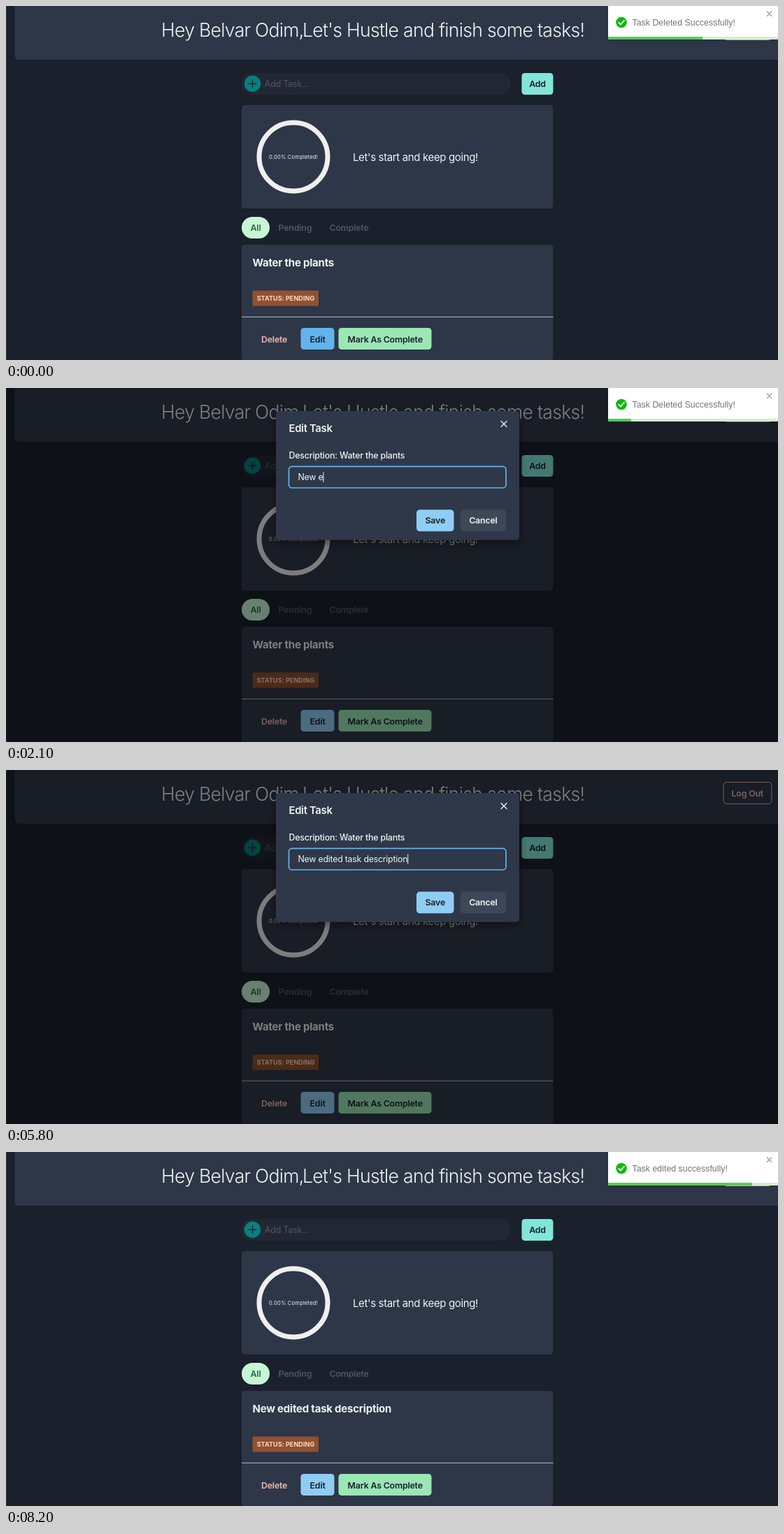
Write an HTML page that moves like this. It is 1104x507 px and loops after 8.3 s.

```html
<!DOCTYPE html>
<html lang="en">
<head>
<meta charset="utf-8">
<title>Task list</title>
<style>
  html, body { margin: 0; width: 100%; height: 100%; overflow: hidden; background: #1a202c; }
  svg { display: block; width: 100vw; height: 100vh; }
  text { font: 400 12.4px Inter, "Open Sans", sans-serif; letter-spacing: -.2px; font-optical-sizing: none; white-space: pre; fill: #f0f1f3; }
  .semi { font-weight: 600; }
  .medium { font-weight: 500; }
  .dark { fill: #1a202c; }
  .muted { fill: #4e5666; }
  .rose { fill: #f0b9ae; }
  .title { font-size: 26.6px; font-weight: 300; letter-spacing: -.72px; }
  .cheer { font-size: 15px; letter-spacing: -.36px; }
  .task { font-size: 15px; font-weight: 700; letter-spacing: -.22px; }
  .badge { font-size: 9px; font-weight: 700; letter-spacing: .08px; fill: #fbd9c6; }
  .percent { font-size: 7.6px; letter-spacing: .18px; }
  .heading { font-size: 14.9px; font-weight: 600; letter-spacing: -.35px; }
  .entry { letter-spacing: -.25px; }
  .notice { font: 400 12.4px "Liberation Sans", Arial, sans-serif; letter-spacing: 0; fill: #757575; }
  .mid { text-anchor: middle; }
  .line { fill: none; stroke-linecap: round; stroke-linejoin: round; }
</style>
</head>
<body>
<svg viewBox="0 0 1104 507">
  <defs>
    <filter id="dialogShadow" x="-10%" y="-15%" width="120%" height="140%">
      <feDropShadow dx="0" dy="5" stdDeviation="6" flood-color="#000" flood-opacity=".4"/>
    </filter>
    <filter id="toastShadow" x="-10%" y="-30%" width="120%" height="170%">
      <feDropShadow dx="0" dy="1" stdDeviation="3" flood-color="#000" flood-opacity=".15"/>
    </filter>
  </defs>

  <rect width="1104" height="507" fill="#1a202c"/>
  <rect width="1" height="507" fill="#333a45"/>

  <g id="header">
    <rect x="12.5" y="-10" width="1100" height="87" rx="6" fill="#2d3748"/>
    <text class="title" x="222" y="43.5">Hey Belvar Odim,</text>
    <text class="title" x="424" y="43.5">Let's Hustle and finish some tasks!</text>
    <rect x="1026" y="17.5" width="69" height="31" rx="4.6" fill="none" stroke="#f0b9ae"/>
    <text class="semi rose mid" x="1060.3" y="38">Log Out</text>
  </g>

  <g id="newTask">
    <rect x="337" y="96" width="385" height="31" rx="15.5" fill="#222833"/>
    <circle cx="352.5" cy="111.3" r="11.7" fill="#06807e"/>
    <path class="line" d="M347.5 111.3h10M352.5 106.3v10" stroke="#1a202c" stroke-width="1.4"/>
    <text class="muted" x="370" y="116">Add Task...</text>
    <rect x="737.5" y="96" width="45" height="31" rx="4.6" fill="#81e6d9"/>
    <text class="semi dark mid" x="760" y="116">Add</text>
  </g>

  <g id="progress">
    <rect x="337" y="142" width="445.5" height="148" rx="4.6" fill="#2d3748"/>
    <circle cx="411" cy="216" r="49" fill="none" stroke="#efefef" stroke-width="7"/>
    <text class="percent mid" x="411" y="219">0.00% Completed!</text>
    <text class="cheer" x="496" y="222">Let's start and keep going!</text>
  </g>

  <g id="tabs">
    <rect x="337" y="302" width="40" height="31" rx="15.5" fill="#c6f6d5"/>
    <text class="semi mid" x="357" y="322" style="fill:#276749">All</text>
    <text class="semi muted" x="389.5" y="322">Pending</text>
    <text class="semi muted" x="462.5" y="322">Complete</text>
  </g>

  <g id="card">
    <rect x="337" y="342" width="445.5" height="165.5" rx="4.6" fill="#2d3748"/>
    <text id="taskName" class="task" x="352.5" y="373"></text>
    <rect x="352.5" y="407.5" width="94.5" height="22" rx="1.6" fill="#925130"/>
    <text class="badge mid" x="400" y="422">STATUS: PENDING</text>
    <path d="M337 445.3h445.5" stroke="#b9bec6"/>
    <text class="semi rose" x="365" y="481.5">Delete</text>
    <rect id="editButton" x="421.5" y="461" width="48" height="31" rx="4.6"/>
    <text class="semi dark mid" x="445.6" y="481.5">Edit</text>
    <rect x="475.5" y="461" width="133" height="31" rx="4.6" fill="#9ae6b4"/>
    <text class="semi dark mid" x="542.2" y="481.5">Mark As Complete</text>
  </g>

  <rect id="overlay" width="1104" height="507"/>

  <g id="dialog">
    <rect x="386" y="33" width="348" height="184.5" rx="4.6" fill="#2d3748" filter="url(#dialogShadow)"/>
    <text class="heading" x="404.5" y="62.7">Edit Task</text>
    <path class="line" d="M708 47.5l8 8M716 47.5l-8 8" stroke="#f0f1f3" stroke-width="1.3"/>
    <text class="medium" x="404.5" y="101.3">Description: Water the plants</text>
    <rect id="field" x="404.5" y="112.3" width="310.5" height="30.7" rx="4.6" fill="none"/>
    <text id="entry" class="entry" x="417.5" y="132.3"></text>
    <rect id="caret" y="120.5" width="1" height="14.5" fill="#f0f1f3"/>
    <rect id="saveButton" x="587" y="174.3" width="53.5" height="31" rx="4.6"/>
    <text class="semi dark mid" x="613.8" y="194.4">Save</text>
    <rect x="649.8" y="174.3" width="65.3" height="31" rx="4.6" fill="#3e4757"/>
    <text class="semi mid" x="682.4" y="194.4">Cancel</text>
  </g>

  <g id="toast">
    <rect x="861" y="-6" width="243" height="54" rx="3" fill="#fff" filter="url(#toastShadow)"/>
    <circle cx="880" cy="23.5" r="7.8" fill="#07bc0c"/>
    <path class="line" d="M876.3 23.8l2.7 2.7 4.9-5.6" stroke="#fff" stroke-width="1.8"/>
    <text id="notice" class="notice" x="895.5" y="27.8"></text>
    <path class="line" d="M1088.4 8l6.4 6.4M1094.8 8l-6.4 6.4" stroke="#999" stroke-width="1.3"/>
    <rect x="861" y="44" width="243" height="4" rx="1.5" fill="#cdf2ce"/>
    <rect id="timer" x="861" y="44" height="4" fill="#4fd054"/>
  </g>
</svg>

<script>
  const LOOP = 8300, STEP = 100;
  const OPEN = 90, BLUR = 6800, CLOSE = 7000;
  const TOAST_OUT = 2690, TOAST_IN = 6970;
  const OLD_NAME = "Water the plants", NEW_NAME = "New edited task description";
  // One time per typed character of NEW_NAME.
  const KEYS = [1200, 1400, 1600, 1800, 2000, 2300, 2500, 2600, 2700, 2900, 3300, 3400, 3600, 3600,
    3800, 3800, 4100, 4300, 4500, 4700, 4900, 5100, 5200, 5400, 5500, 5600, 5800];
  const BLUES = { idle: "#90cdf4", hover: "#63b3ed", active: "#4299e1" };

  const $ = id => document.getElementById(id);
  const clamp = v => Math.min(1, Math.max(0, v));
  const ramp = (t, start, length) => clamp((t - start) / length);
  const mix = (a, b, p) => a + (b - a) * p;
  const easeOut = p => 1 - (1 - p) ** 3;
  const smooth = p => p * p * (3 - 2 * p);
  const set = (id, attrs) => {
    for (const name in attrs) $(id).setAttribute(name, attrs[name]);
  };

  // Bouncing entrance from the right, as [time, offset] stops.
  const BOUNCE = [[0, 2328], [420, -19], [525, 8], [630, -4], [700, 0]];

  function toastPose(t) {
    if (t < TOAST_OUT) return { x: 0, opacity: 1 };
    if (t < TOAST_IN) {
      const back = ramp(t, TOAST_OUT, 140);
      const away = smooth(ramp(t, TOAST_OUT + 140, 560));
      return { x: away ? mix(-16, 1552, away) : -16 * back, opacity: 1 - away };
    }
    const age = t - TOAST_IN;
    const next = BOUNCE.findIndex(stop => stop[0] > age);
    if (next < 0) return { x: 0, opacity: 1 };
    const [t0, x0] = BOUNCE[next - 1], [t1, x1] = BOUNCE[next];
    return { x: mix(x0, x1, easeOut(ramp(age, t0, t1 - t0))), opacity: easeOut(ramp(age, 0, 420)) };
  }

  function drawToast(t) {
    const { x, opacity } = toastPose(t);
    const left = t < TOAST_IN ? 2780 - t : 7440 + 5000 - t;
    set("toast", { transform: `translate(${x} 0)`, opacity });
    set("timer", { width: 243 * clamp(left / 5000) });
    $("notice").textContent = t < TOAST_IN ? "Task Deleted Successfully!" : "Task edited successfully!";
  }

  function drawDialog(t) {
    const shown = t < CLOSE ? 1 - (1 - ramp(t, OPEN, 240)) ** 1.6 : 0;
    const scale = mix(.95, 1, shown);
    set("overlay", { opacity: .48 * shown });
    set("dialog", {
      opacity: shown,
      transform: `translate(560 125) scale(${scale}) translate(-560 -125)`
    });

    const typed = KEYS.filter(k => k <= t).length;
    const focused = t < BLUR;
    const entry = $("entry");
    entry.textContent = typed ? NEW_NAME.slice(0, typed) : "New Description";
    entry.style.fill = typed ? "#f0f1f3" : "#626b7b";
    set("field", { stroke: focused ? "#63b3ed" : "#597a94", "stroke-width": focused ? 1.7 : 1 });

    const lastKey = typed ? KEYS[typed - 1] : 200;
    const blinkOn = (t - lastKey + 1000) % 1000 < 500;
    set("caret", {
      x: 417.5 + (typed ? entry.getComputedTextLength() : 0),
      opacity: focused && blinkOn ? 1 : 0
    });
    set("saveButton", { fill: t < 6500 ? BLUES.idle : focused ? BLUES.hover : BLUES.active });
  }

  function draw(t) {
    $("taskName").textContent = t < CLOSE ? OLD_NAME : NEW_NAME;
    set("editButton", { fill: t < 200 ? BLUES.hover : BLUES.idle });
    drawDialog(t);
    drawToast(t);
  }

  const start = performance.now();
  function tick() {
    const t = (performance.now() - start) % LOOP;
    draw(Math.floor(t / STEP) * STEP);
    requestAnimationFrame(tick);
  }
  tick();
</script>
</body>
</html>
```
